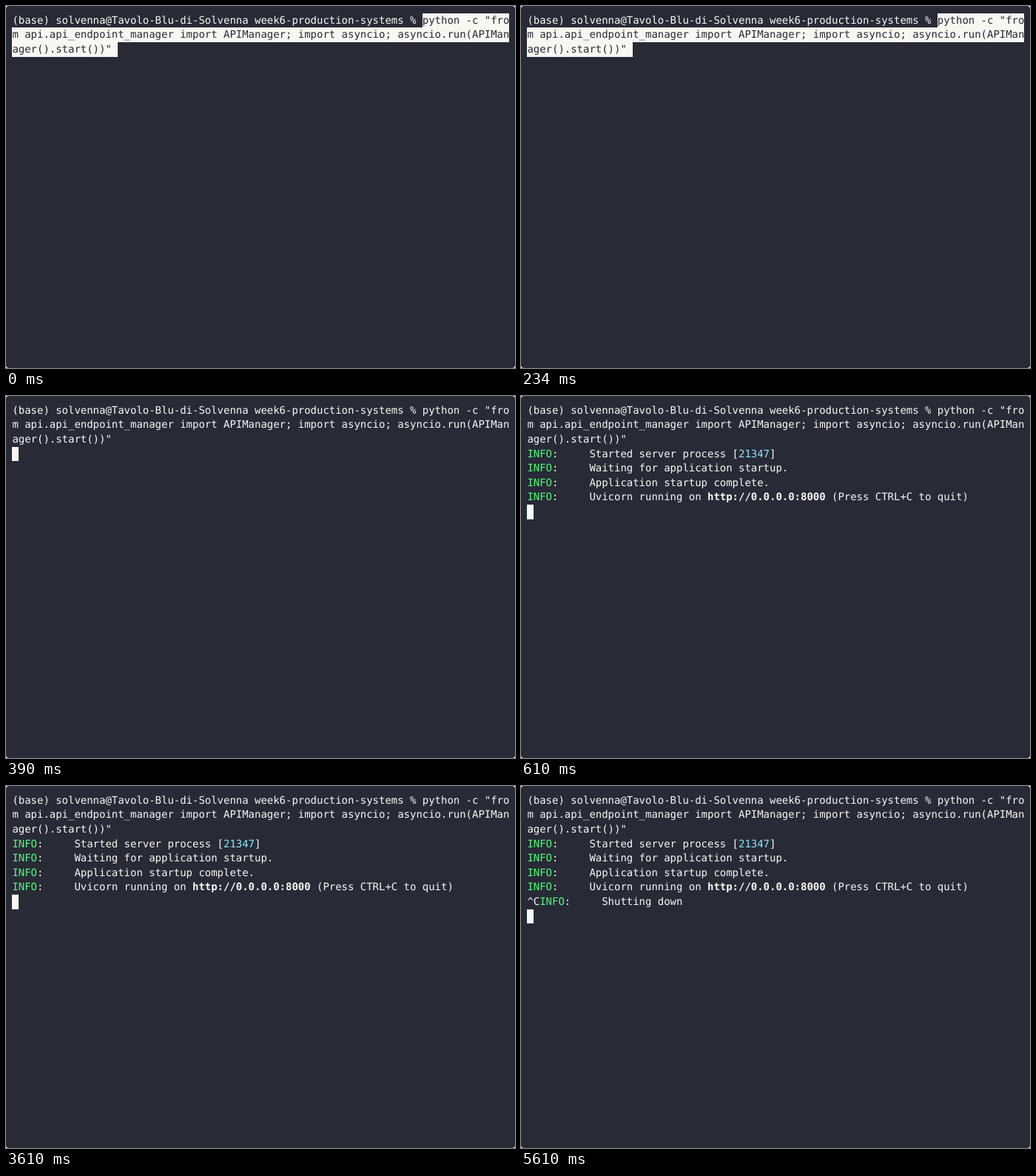
An HTML page for the animation above (5740 ms loop, 688 px wide and 490 px high).

```html
<!DOCTYPE html>
<html lang="en">
<head>
<meta charset="utf-8">
<title>Terminal session</title>
<style>
  html, body { margin: 0; width: 100%; height: 100%; overflow: hidden; background: #fff; }
  svg { display: block; }
  text { font: 14px "DejaVu Sans Mono", monospace; white-space: pre; text-rendering: geometricPrecision; }
  .cell { shape-rendering: crispEdges; }
</style>
</head>
<body>
<svg width="688" height="490">
  <rect width="688" height="490" rx="4" fill="#282a36"/>
  <g id="screen"></g>
</svg>
<script>
const FG = '#f8f8f2', BG = '#282a36', GREEN = '#50fa7b', CYAN = '#8be9fd';
const CELL = 8.4, ROW = 19.6, LOOP = 5740;
const STARTS = [0, 390, 610, 5610];
const screen = document.getElementById('screen');

const colX = col => (col + 1) * CELL;
const rowY = row => (row + 0.5) * ROW;

function add(tag, attributes, content = '') {
  const node = document.createElementNS('http://www.w3.org/2000/svg', tag);
  for (const name in attributes) node.setAttribute(name, attributes[name]);
  node.textContent = content;
  screen.append(node);
}

function block(row, col, cells) {
  add('rect', { class: 'cell', x: colX(col), y: rowY(row), width: cells * CELL, height: ROW, fill: FG });
}

// Every character sits in its own terminal cell.
function print(row, col, str, fill = FG, weight = 'normal') {
  const x = Array.from(str, (_, i) => colX(col + i).toFixed(2)).join(' ');
  add('text', { x, y: rowY(row) + 14, fill, style: `font-weight:${weight}` }, str);
  return col + str.length;
}

function info(row, ...spans) {
  let col = print(row, 0, 'INFO', GREEN);
  col = print(row, col, ':     ');
  for (const span of spans) col = print(row, col, ...[].concat(span));
}

function command(selected) {
  const ink = selected ? BG : FG;
  if (selected) {
    block(0, 66, 14);
    block(1, 0, 80);
    block(2, 0, 17);
  }
  print(0, 0, '(base) solvenna@Tavolo-Blu-di-Solvenna week6-production-systems % ');
  print(0, 66, 'python -c "fro', ink);
  print(1, 0, 'm api.api_endpoint_manager import APIManager; import asyncio; asyncio.run(APIMan', ink);
  print(2, 0, 'ager().start())"', ink);
}

function draw(step) {
  screen.replaceChildren();
  command(step === 0);
  if (step >= 2) {
    info(3, 'Started server process [', ['21347', CYAN], ']');
    info(4, 'Waiting for application startup.');
    info(5, 'Application startup complete.');
    info(6, 'Uvicorn running on ', ['http://0.0.0.0:8000', FG, 'bold'], ' (Press CTRL+C to quit)');
  }
  if (step === 3) {
    print(7, 0, '^C');
    print(7, 2, 'INFO', GREEN);
    print(7, 6, ':     Shutting down');
  }
  if (step > 0) block([0, 3, 7, 8][step], 0, 1);
}

const begin = performance.now();
let shown = -1;

function tick() {
  const time = (performance.now() - begin) % LOOP;
  const step = STARTS.filter(start => start <= time).length - 1;
  if (step !== shown) draw(shown = step);
  requestAnimationFrame(tick);
}
tick();
</script>
</body>
</html>
```
